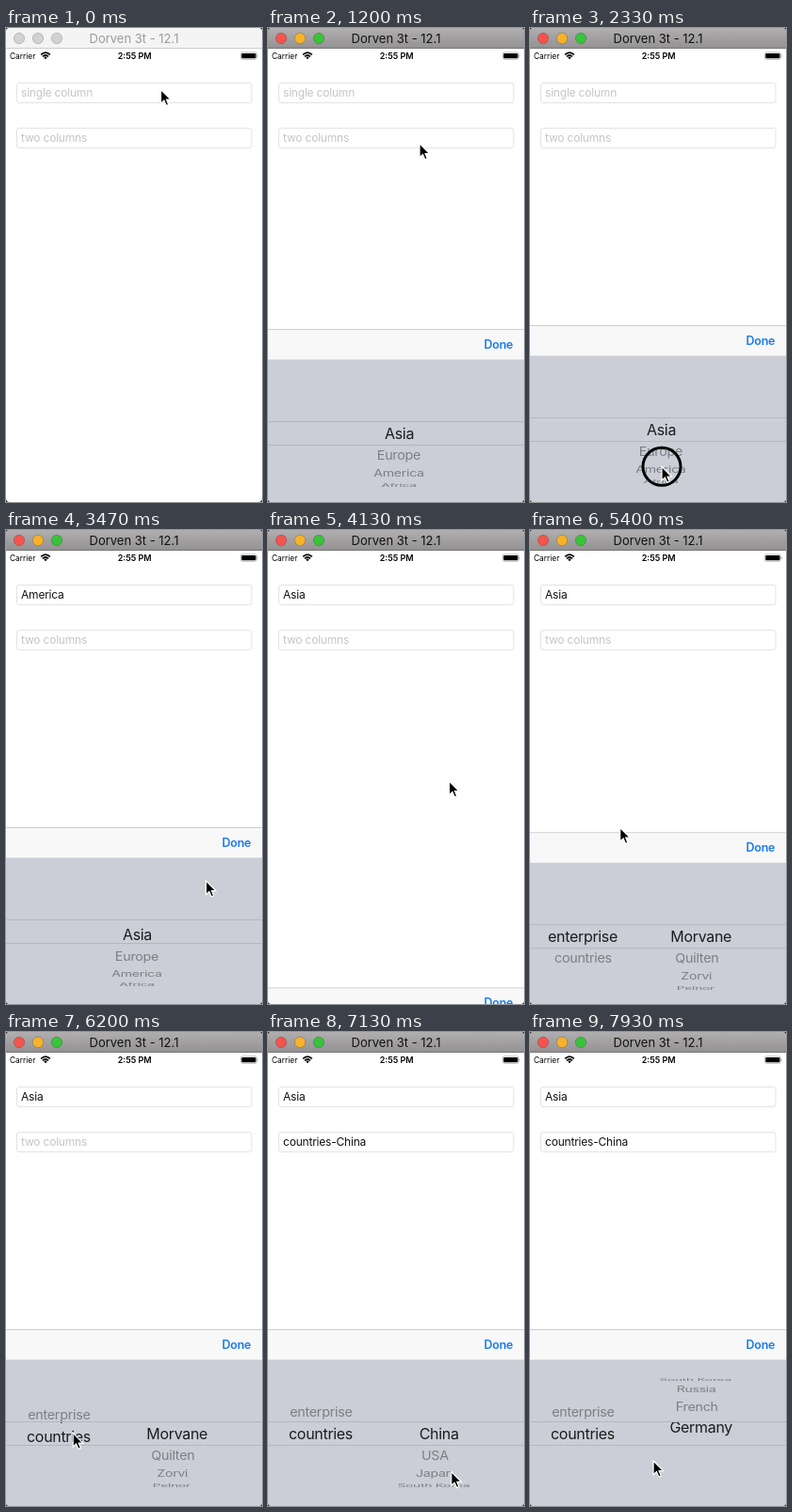
An HTML page for the animation above (8000 ms loop, 272 by 504 pixels).

```html
<!DOCTYPE html>
<html lang="en">
<head>
<meta charset="utf-8">
<title>Picker demo</title>
<style>
  html, body { margin: 0; width: 100%; height: 100%; overflow: hidden; background: #2b2b2b; }
  svg { display: block; width: 272px; height: 504px; font-family: Inter, "Liberation Sans", sans-serif; }
  .field rect { fill: #fff; stroke: #e3e3e3; }
  .field text { font-size: 12px; letter-spacing: -.2px; }
  .row { font-size: 16px; letter-spacing: -.3px; text-anchor: middle; }
  .mid .row { fill: #1c1c1e; }
  .far .row { fill: #000; opacity: .39; }
</style>
</head>
<body>
<svg viewBox="0 0 272 504">
  <defs>
    <linearGradient id="bar" x2="0" y2="1">
      <stop stop-color="#b0aeaf"/><stop offset="1" stop-color="#949192"/>
    </linearGradient>
    <clipPath id="win"><rect width="272" height="504" rx="4"/></clipPath>
    <clipPath id="inBand"><rect y="413.5" width="272" height="26"/></clipPath>
    <clipPath id="offBand"><path d="M0 349H272V413.5H0ZM0 439.5H272V504H0Z"/></clipPath>
  </defs>
  <g clip-path="url(#win)">
    <rect width="272" height="504" fill="#fff"/>
    <rect id="title" width="272" height="22"/>
    <path id="edge" d="M0 21.5H272"/>
    <g id="lights"></g>
    <text id="name" x="136" y="16" font-size="13" text-anchor="middle">Dorven 3t - 12.1</text>

    <text x="4" y="32.5" font-size="8.4">Carrier</text>
    <g fill="none" stroke="#000" stroke-width="1.7">
      <path d="M37.2 28.4Q42 23.9 46.8 28.4M39 30.4Q42 27.6 45 30.4"/>
      <path d="M40.3 31.4Q42 29.8 43.7 31.4L42 33.3Z" fill="#000" stroke="none"/>
    </g>
    <text x="136.7" y="32.6" font-size="9" font-weight="600" text-anchor="middle">2:55 PM</text>
    <rect x="249.4" y="25.9" width="17" height="7.4" rx="1.8" fill="#fff" stroke="#a0a0a0" stroke-width=".7"/>
    <rect x="250.3" y="26.9" width="15.2" height="5.4" rx="1"/>
    <path d="M267.2 28.4q1.2 1.3 0 2.6z" fill="#777"/>

    <g class="field"><rect x="11.5" y="58.5" width="249.5" height="21" rx="2.5"/><text id="one" x="16" y="73"></text></g>
    <g class="field"><rect x="11.5" y="106.5" width="249.5" height="21" rx="2.5"/><text id="two" x="16" y="121"></text></g>

    <g id="picker">
      <rect y="317" width="272" height="32" fill="#f8f8f8"/>
      <path d="M0 316.5H272" stroke="#cfcfcf"/>
      <text x="260.3" y="336.8" font-size="12.5" font-weight="600" letter-spacing="-.2" text-anchor="end" fill="#1b7bea">Done</text>
      <rect y="348.5" width="272" height="156" fill="#cbced6"/>
      <g class="far" clip-path="url(#offBand)"></g>
      <g class="mid" clip-path="url(#inBand)"></g>
      <path d="M0 414.5H272M0 439.5H272" stroke="#b4b7be"/>
    </g>
    <g id="cursor">
      <circle id="ring" r="20" fill="none" stroke="#000" stroke-width="3"/>
      <path d="M0 0V14.7L3.4 11.6L5.8 17L8.2 15.9L6 10.7H10.5Z" stroke="#fff" stroke-width="1.2"/>
    </g>
  </g>
</svg>
<script>
const NS = 'http://www.w3.org/2000/svg';
const $ = id => document.getElementById(id);
const LOOP = 8000, STEP = 200 / 3;
const RADIUS = 59, TURN = 23 * Math.PI / 180, CENTER = 427;

const regions = ['Asia', 'Europe', 'America', 'Africa'];
const kinds = ['enterprise', 'countries'];
const firms = ['Morvane', 'Quilten', 'Zorvi', 'Pelnor'];
const countries = ['China', 'USA', 'Japan', 'South Korea', 'Russia', 'French', 'Germany'];

// The pointer's script: each leg runs from the end of the one before it.
const legs = [{ end: 0, x: 164.5, y: 65.5 }];
const last = () => legs[legs.length - 1];
const move = (end, x, y) => legs.push({ end, x, y });
const press = (end, dx = 0, dy = 0) => legs.push({ end, x: last().x + dx, y: last().y + dy, down: true });

move(730, 164.5, 65.5);
press(870);
move(2265, 140, 471);
press(2610, 0, -46);
move(3000, 146, 414);
press(3210, 6, 40);
move(3467, 212.5, 373);
move(3790, 244, 333);
press(3920);
move(4533, 59.5, 96.5);
move(4930, 56, 117);
press(5060);
move(5400, 95.7, 316.5);
move(5860, 70, 454);
press(6140, 0, -28);
move(7195, 196, 468);
press(7475, -8, -68);
move(LOOP - 60, 131, 456);

function ease(t, from, to) {
  const p = Math.min(1, Math.max(0, (t - from) / (to - from)));
  return p * p * (3 - 2 * p);
}

// critically damped, 1 -> 0
function settle(ms) {
  const x = Math.max(0, ms) * .0165;
  return (1 + x) * Math.exp(-x);
}

// flicked wheel, 0 -> 1 with an overshoot
function flick(ms) {
  const s = Math.max(0, ms) / 1000;
  return 1 - Math.exp(-6 * s) * Math.cos(7 * s);
}

function sheetOffset(t) {
  const hidden = t < 3900 ? settle(t - 850) : t < 5070 ? 1 - settle(t - 3900) : settle(t - 5070);
  return hidden < .003 ? 0 : hidden * 190;
}

function add(parent, tag, attrs) {
  const el = document.createElementNS(NS, tag);
  for (const k in attrs) el.setAttribute(k, attrs[k]);
  return parent.appendChild(el);
}

const lights = ['#f4544d', '#f6b22b', '#39c23c'].map((color, i) => ({
  color, el: add($('lights'), 'circle', { cx: 14 + 20 * i, cy: 11, r: 5.7, 'stroke-opacity': .18 })
}));

function pool(layer) {
  const g = document.querySelector(layer);
  return Array.from({ length: kinds.length + countries.length }, () => add(g, 'text', { class: 'row' }));
}
const far = pool('.far'), mid = pool('.mid');

function drawRows(wheels) {
  let n = 0;
  for (const w of wheels) w.list.forEach((label, i) => {
    const a = (i - w.pos) * TURN, c = Math.cos(a);
    const shown = Math.abs(a) < 1.5;
    const y = CENTER + RADIUS * Math.sin(a);
    const put = (el, x, s) => {
      el.textContent = shown ? label : '';
      el.setAttribute('transform', `translate(${x} ${y}) scale(${s} ${s * c}) translate(0 5.7)`);
    };
    put(far[n], w.x + w.lean * c, .9 * (1 - .06 * (1 - c)));
    put(mid[n], w.midX, 1);
    n++;
  });
  for (; n < far.length; n++) far[n].textContent = mid[n].textContent = '';
}

function setField(id, value, hint) {
  $(id).textContent = value || hint;
  $(id).setAttribute('fill', value ? '#111' : '#c5c5c9');
}

function drawPointer(t) {
  const i = legs.findIndex(l => l.end > t), a = legs[i - 1] || last(), b = legs[i] || last();
  const p = ease(t, a.end, b.end);
  $('cursor').setAttribute('transform', `translate(${a.x + (b.x - a.x) * p} ${a.y + (b.y - a.y) * p})`);
  $('ring').setAttribute('visibility', b.down ? 'visible' : 'hidden');
}

function draw(t) {
  const active = t >= 730;
  $('title').setAttribute('fill', active ? 'url(#bar)' : '#f4f4f4');
  $('edge').setAttribute('stroke', active ? '#777576' : '#cccccc');
  $('name').setAttribute('fill', active ? '#111' : '#9b9b9b');
  for (const { color, el } of lights) {
    el.setAttribute('fill', active ? color : '#d2d2d2');
    el.setAttribute('stroke', '#000');
  }

  const chosen = t >= 6340;
  setField('one', t < 2870 ? '' : t < 3740 ? 'America' : 'Asia', 'single column');
  setField('two', chosen ? 'countries-China' : '', 'two columns');

  $('picker').setAttribute('transform', `translate(0 ${sheetOffset(t)})`);
  drawRows(t < 4700
    ? [{ list: regions, pos: 2 * ease(t, 2340, 2750) - 2 * flick(t - 3047), x: 139, lean: 0, midX: 139.5 }]
    : [
      { list: kinds, pos: ease(t, 5900, 6300), x: 56.4, lean: 0, midX: 56 },
      { list: chosen ? countries : firms, pos: 6 * flick(t - 7430), x: 175, lean: 2.6, midX: 181.7 }
    ]);
  drawPointer(t);
}

function tick() {
  const t = performance.now() % LOOP;
  draw(Math.floor((t + 5) / STEP) * STEP % LOOP);
  requestAnimationFrame(tick);
}
tick();
</script>
</body>
</html>
```
